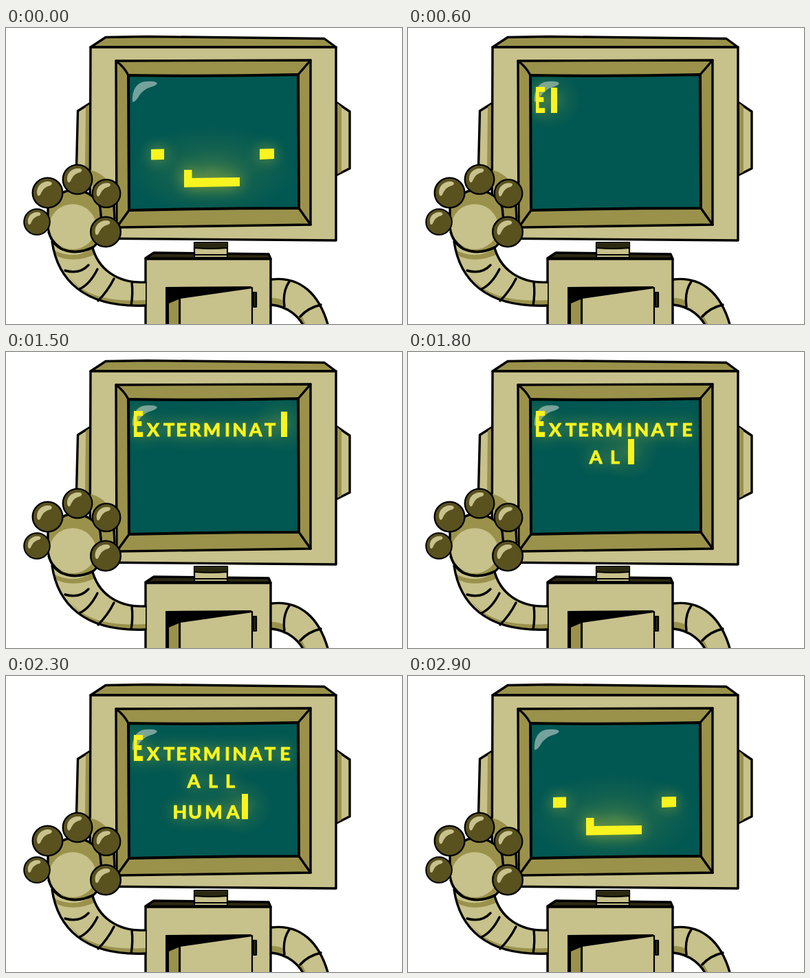
These frames come from a looping animation (576 px wide and 432 px high, 3 s). An HTML page:

```html
<!DOCTYPE html>
<html lang="en">
<head>
<meta charset="utf-8">
<title>Robot</title>
<style>
  html, body { margin: 0; width: 100%; height: 100%; overflow: hidden; background: #fff; }
  svg { display: block; width: 576px; height: 432px; }
  .ink { stroke: #000; stroke-width: 3.4; stroke-linejoin: round; stroke-linecap: round; }
  .thin { stroke-width: 2.2; }
  .thick { stroke-width: 4; }
  .light { fill: #c7c18b; }
  .mid { fill: #9a924b; }
  .dark { fill: #2b2911; }
  .line { fill: none; }
  .glow { filter: drop-shadow(0 0 11px #e8e03499); }
  #face, #letters, #cursor { fill: #f9f41f; }
  #letters { font: 700 27px Lato, "Open Sans", sans-serif; text-anchor: middle;
    stroke: #f9f41f; stroke-width: 1; stroke-linejoin: round; }
</style>
</head>
<body>
<svg viewBox="0 0 576 432">
  <defs>
    <radialGradient id="halo">
      <stop offset="0" stop-color="#d8d83a" stop-opacity=".36"/>
      <stop offset=".5" stop-color="#a8b83c" stop-opacity=".15"/>
      <stop offset="1" stop-color="#a8b83c" stop-opacity="0"/>
    </radialGradient>
    <clipPath id="glass"><path d="M180 70 424 69 425 262 181 265Z"/></clipPath>
  </defs>

  <!-- right arm -->
  <path class="light" d="M386 367C426 362 457 386 470 440H435C428 421 409 406 386 404Z"/>
  <path class="mid" d="M386 394C394 394 400 396 404 398L405 407 386 404ZM430 420 440 440H435L425 421Z"/>
  <path class="ink line" d="M386 367C426 362 457 386 470 440M435 440C428 421 409 406 386 404M412 370Q402 385 405 406M428 421Q440 408 458 404"/>

  <!-- body and neck -->
  <path class="ink dark" d="M203 336 215 328 382 330 385 337Z"/>
  <path class="ink light" d="M203 337H385V440H203Z"/>
  <path d="M232 378 357 377V381L254 395V440H232Z"/>
  <path class="mid" d="M237 402 251 396V440H237Z"/>
  <path class="ink light thin" d="M253 394 358 379V440H253Z"/>
  <path class="ink dark thin" d="M359.500 386H364V407H359.500Z"/>
  <path class="ink light thin" d="M274 313H322V335H274Z"/>
  <path class="dark" d="M274 313H322V320Q298 324 274 320Z"/>
  <path class="ink line thin" d="M275 321Q298 323 321 321M275 331H321"/>

  <!-- monitor -->
  <path class="ink light" d="M122 110 104.500 121 102.500 202 123 214ZM481 109 500 122V205L482 214Z"/>
  <path class="mid" d="M122 111 116 115 115 205 122 209ZM482 110 488 115V210L482 213Z"/>
  <path class="ink mid" d="M123 28 145 13.500 205 12.500 463 15.500 480 28Z"/>
  <path class="ink light" d="M123 28H480V310L122 307Z"/>
  <path class="ink mid" d="M160 48 443 47 443 287 161 291Z"/>
  <path class="ink line" d="M160 48Q172 57 178 69M443 47 425 68M443 287 426 263M161 291 179 266"/>
  <path class="ink thick" fill="#015752" d="M178 69Q300 71 425 68L426 263Q300 263 179 266Z"/>

  <g clip-path="url(#glass)">
    <path fill="#75a29d" d="M184 108C183 90 190 79 204 78Q218 77 220 81C217 86 209 85 201 91C192 97 192 107 184 108Z"/>
    <g id="face">
      <ellipse cx="300" cy="208" rx="122" ry="66" fill="url(#halo)" opacity=".7"/>
      <path class="glow" d="M211 177 230 176.500V192L211 192.500ZM369 176.500 390 176V191L369 192ZM259 207H270.500V219L340 218V231L259 232.500Z"/>
    </g>
    <g id="typing">
      <ellipse id="spot" rx="42" ry="42" fill="url(#halo)" opacity=".65"/>
      <g id="letters" class="glow"></g>
      <rect id="cursor" width="9" height="37"/>
    </g>
  </g>

  <!-- left arm -->
  <path class="light" d="M67 312C75 366 112 409 203 405V371C162 373 133 352 125 317Z"/>
  <path class="mid" d="M69 324Q100 340 126 321L130 330Q101 344 74 333ZM88 357C110 392 150 400 203 397V405C150 408 112 395 88 357Z"/>
  <path class="ink line" d="M67 312C75 366 112 409 203 405M203 371C162 373 133 352 125 317M86 354Q107 360 120 346M107 381Q122 374 133 352M134 398Q148 384 157 366M183 371Q185 388 182 405"/>

  <!-- hand -->
  <path class="mid" d="M123 207Q139 212 147 222L126 235ZM128 255H160V282H128Z"/>
  <path class="ink line" d="M157 260 158 278"/>
  <path class="ink mid" d="M61 263Q77 236 100 236Q130 240 137 262L139 282Q138 314 125 321Q101 332 80 322Q66 312 61 292Z"/>
  <ellipse class="light" cx="97" cy="290" rx="34" ry="33"/>
  <path class="ink line" d="M62 298Q68 317 82 323Q103 331 126 320"/>
  <g id="knobs"></g>
</svg>
<script>
const $ = id => document.getElementById(id);

function add(parent, tag, attrs, text = '') {
  const node = document.createElementNS('http://www.w3.org/2000/svg', tag);
  for (const key in attrs) node.setAttribute(key, attrs[key]);
  node.textContent = text;
  parent.append(node);
  return node;
}

for (const [x, y, r] of [[104, 221, 21], [60.5, 240.5, 21.5], [146, 241.5, 20], [45, 283, 18.5], [145, 297.5, 21.5]]) {
  const knob = add($('knobs'), 'g', { transform: `translate(${x} ${y}) scale(${r / 20})` });
  add(knob, 'circle', { r: 20.3, class: 'ink thin', fill: '#59521f' });
  add(knob, 'path', { fill: '#c7c18b', d: 'M-14 2C-16 -9 -7 -17 4 -15Q8 -13 4 -10C-5 -8 -7 -3 -10 3Q-13 6 -14 2Z' });
}

const rows = [
  [123, 'EXTERMINATE', [192, 214, 237, 255, 275, 299.5, 322, 340, 363, 384, 406]],
  [163, 'ALL', [273, 301, 326]],
  [208, 'HUMANS', [253, 275, 302, 330, 349, 371]],
];
const letters = rows.flatMap(([y, word, xs]) => xs.map((x, i) => {
  const tall = y === 123 && i === 0 ? 1.85 : 1; // drop capital
  const node = add($('letters'), 'text', { transform: `translate(${x} ${y}) scale(1 ${tall})` }, word[i]);
  return { x, y, node };
}));

const STEP = 100, LOOP = 3000, START = 500, END = 2900;

function draw(now) {
  const time = now % LOOP;
  const typing = time >= START && time < END;
  $('face').style.display = typing ? 'none' : '';
  $('typing').style.display = typing ? '' : 'none';

  const count = Math.floor((time - START) / STEP);
  letters.forEach(({ node }, i) => node.style.display = i < count ? '' : 'none');

  const next = letters[Math.max(count, 0)];
  for (const id of ['cursor', 'spot']) $(id).style.display = next ? '' : 'none';
  if (next) {
    $('cursor').setAttribute('transform', `translate(${next.x - 6} ${next.y - 36})`);
    $('spot').setAttribute('transform', `translate(${next.x - 4} ${next.y - 18})`);
  }
  requestAnimationFrame(draw);
}
draw(performance.now());
</script>
</body>
</html>
```
